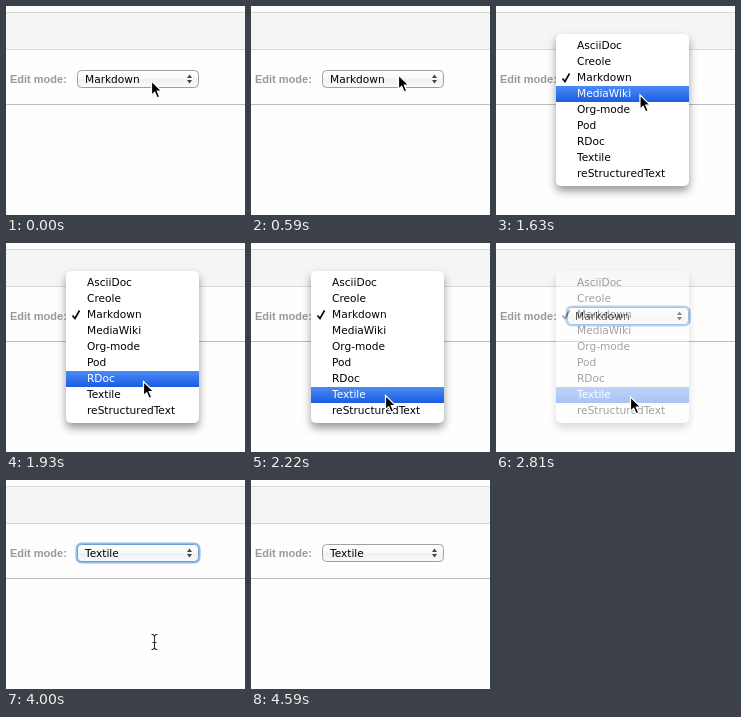
Recreate the animation shown at these times as an HTML page. Size 239 by 209 pixels, loop 4730 ms.

```html
<!DOCTYPE html>
<html lang="en">
<head>
<meta charset="utf-8">
<title>Edit mode menu</title>
<style>
  html, body { margin: 0; width: 100%; height: 100%; overflow: hidden; background: #fff; }
  svg { display: block; }
  text { font: 10.6px "DejaVu Sans", sans-serif; fill: #000; }
  .label { font: bold 11px "Liberation Sans", Arial, sans-serif; fill: #999; }
  .sheet { fill: #fff; filter: drop-shadow(0 5px 4.5px rgba(0, 0, 0, .4)); }
  .on { fill: #fff; }
</style>
</head>
<body>
<svg width="239" height="209" viewBox="0 0 239 209">
  <defs>
    <linearGradient id="face" x2="0" y2="1">
      <stop stop-color="#fff"/><stop offset=".5" stop-color="#f8f8f8"/>
      <stop offset=".5" stop-color="#f0f0f0"/><stop offset="1" stop-color="#fafafa"/>
    </linearGradient>
    <linearGradient id="blue" x2="0" y2="1">
      <stop stop-color="#4b8bf4"/><stop offset="1" stop-color="#1b5ce4"/>
    </linearGradient>
  </defs>

  <rect width="239" height="209" fill="#fefefe"/>
  <rect y="6" width="239" height="38" fill="#f5f5f5"/>
  <path d="M0 6.5H239M0 43.5H239" stroke="#d8d8d8"/>
  <path d="M0 98.5H239" stroke="#bdbdbd"/>
  <text class="label" x="4" y="77">Edit mode:</text>

  <rect id="ring" x="70.5" y="63.5" width="123" height="19" rx="5" fill="none" stroke="#8ebbe8" stroke-width="2"/>
  <rect id="box" x="71.5" y="64.5" width="121" height="17" rx="4" fill="url(#face)"/>
  <path d="M181 72L183.5 68.5L186 72ZM181 74L183.5 77.5L186 74Z" fill="#444"/>
  <text id="value" x="79" y="77"></text>

  <g id="menu">
    <rect class="sheet" x="60" y="28" width="133" height="152" rx="5"/>
    <rect id="bar" x="60" width="133" height="16" fill="url(#blue)"/>
    <path id="check" d="M66.5 72.5L69 75.5L73.5 67.5" fill="none" stroke-width="1.6"/>
  </g>

  <path id="arrow" d="M0 0V14.2L3.2 11.2L5.6 16.8L8.2 15.7L5.8 10.2H10.2Z" fill="#000" stroke="#fff" stroke-width="1.2"/>
  <path id="beam" d="M-3 -7.5H-1.5L0 -6L1.5 -7.5H3M0 -6V6M-3 7.5H-1.5L0 6L1.5 7.5H3M-2 .5H2" fill="none" stroke="#333" stroke-width="1.1"/>
</svg>
<script>
const LOOP = 4730;
const ROW = 16;
const TOP = 32;
const MODES = ["AsciiDoc", "Creole", "Markdown", "MediaWiki", "Org-mode", "Pod", "RDoc", "Textile", "reStructuredText"];
const $ = id => document.getElementById(id);

// Each step overrides part of the state before it.
const STEPS = [
  { at: 0, value: "Markdown", focus: false, menu: 0, row: 2, arrow: [145.5, 75], beam: null },
  { at: 290, arrow: [146, 75] },
  { at: 440, arrow: [148, 76] },
  { at: 590, arrow: [147.5, 69] },
  { at: 1040, arrow: [146.5, 74] },
  { at: 1180, menu: 1 },
  { at: 1630, row: 3, arrow: [144, 89] },
  { at: 1780, row: 5, arrow: [141, 118] },
  { at: 1930, row: 6, arrow: [137.5, 138.5] },
  { at: 2070, row: 7, arrow: [135, 154] },
  { at: 2220, arrow: [134.5, 152.5] },
  { at: 2810, menu: .36, focus: true, arrow: [134.5, 154] },
  { at: 2960, menu: 0, value: "Textile" },
  { at: 4000, arrow: null, beam: [148.5, 162] },
  { at: 4150, beam: [187.5, 198] },
  { at: 4300, beam: null },
  { at: 4590, focus: false }
];

const items = MODES.map((name, i) => {
  const item = document.createElementNS("http://www.w3.org/2000/svg", "text");
  item.setAttribute("x", 81);
  item.setAttribute("y", TOP + ROW * i + 11);
  item.textContent = name;
  $("menu").append(item);
  return item;
});

function show(id, visible) {
  $(id).setAttribute("visibility", visible ? "visible" : "hidden");
}

function place(id, point) {
  show(id, point);
  if (point) $(id).setAttribute("transform", `translate(${point})`);
}

function draw(time) {
  const state = Object.assign({}, ...STEPS.filter(step => step.at <= time));
  $("value").textContent = state.value;
  show("ring", state.focus);
  $("box").setAttribute("stroke", state.focus ? "#6f9fd0" : "#a0a0a0");
  $("menu").setAttribute("opacity", state.menu);
  $("bar").setAttribute("y", TOP + ROW * state.row);
  $("check").setAttribute("stroke", state.row === 2 ? "#fff" : "#000");
  items.forEach((item, i) => item.classList.toggle("on", i === state.row));
  place("arrow", state.arrow);
  place("beam", state.beam);
}

const start = performance.now();
function tick() {
  draw((performance.now() - start) % LOOP);
  requestAnimationFrame(tick);
}
tick();
</script>
</body>
</html>
```
